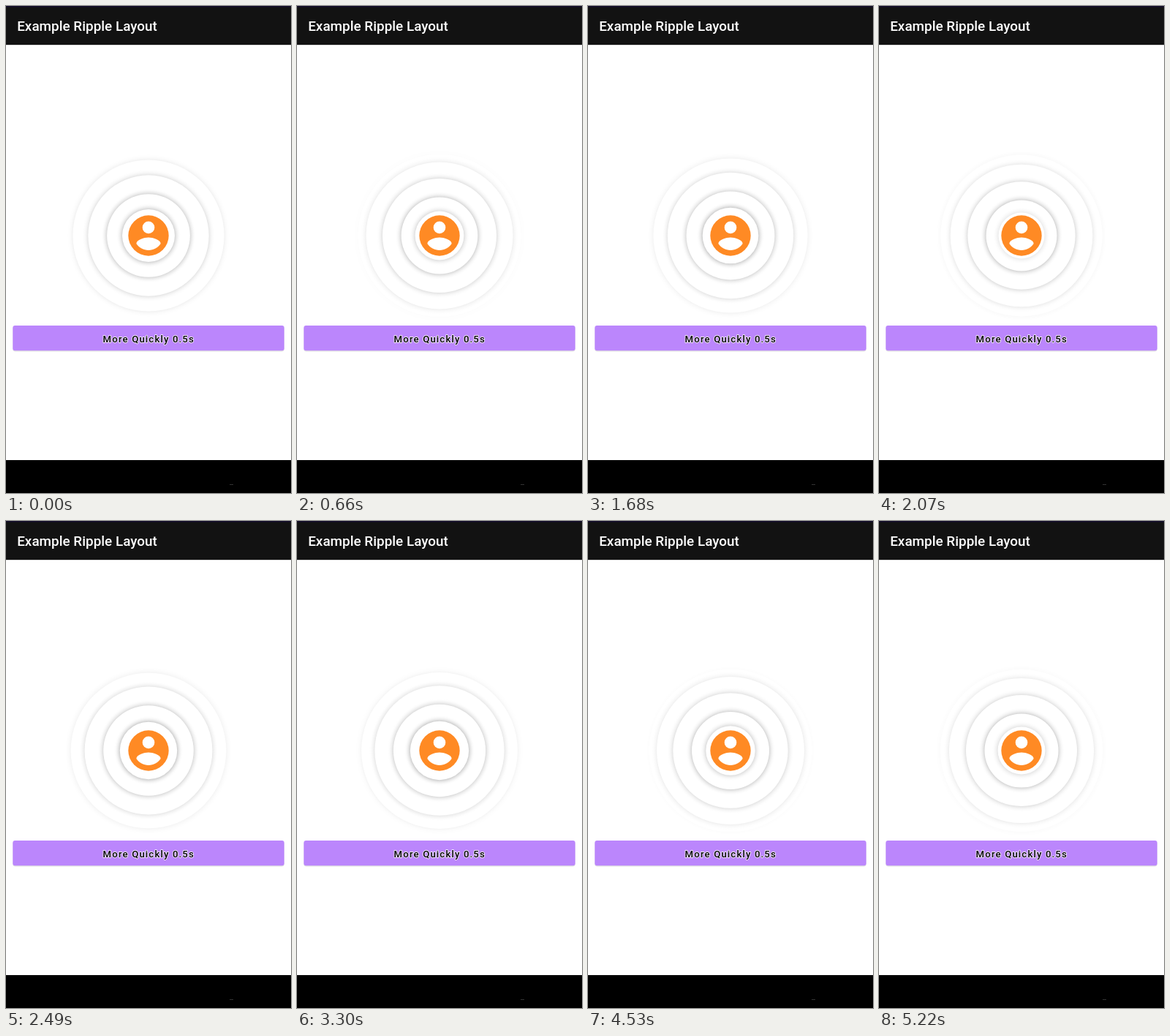
An HTML page with a canvas that plays this animation: 390x666 px, repeating every 5250 ms.

```html
<!DOCTYPE html>
<html lang="en">
<head>
<meta charset="utf-8">
<title>Example Ripple Layout</title>
<style>
  html, body { margin: 0; width: 100%; height: 100%; overflow: hidden; background: #fff; }
  canvas, svg { position: absolute; left: 0; top: 0; width: 390px; height: 666px; }
  text { font-family: Roboto, "Open Sans", sans-serif; font-weight: 500; }
  .title { font-size: 18.9px; fill: #fff; }
  .label {
    font-size: 13.2px; letter-spacing: 1.13px; fill: #000;
    stroke: #f3eaff; stroke-width: 1.8px; stroke-linejoin: round; paint-order: stroke;
  }
</style>
</head>
<body>
<canvas id="ripples" width="390" height="666"></canvas>
<svg viewBox="0 0 390 666">
  <rect width="390" height="54" fill="#000" opacity=".15"/>
  <rect width="390" height="53" fill="#121212"/>
  <rect width="390" height="1.5" fill="#120c2a"/>
  <text class="title" x="15.2" y="34">Example Ripple Layout</text>

  <g transform="translate(195 314) scale(2.768) translate(-12 -12)">
    <circle cx="12" cy="12" r="10" fill="#ff8a24"/>
    <circle cx="12" cy="8" r="3" fill="#fff"/>
    <path fill="#fff" d="M12 19.2c-2.5 0-4.71-1.28-6-3.22.03-1.99 4-3.08 6-3.08 1.99 0 5.97 1.09 6 3.08-1.29 1.94-3.5 3.22-6 3.22z"/>
  </g>

  <rect x="9.3" y="438.5" width="371.4" height="34" rx="3.5" fill="#000" opacity=".12"/>
  <rect x="9.3" y="437" width="371.4" height="34.3" rx="3" fill="#bb86fc"/>
  <text class="label" x="132.6" y="459.5">More Quickly 0.5s</text>

  <rect y="621" width="390" height="45"/>
  <rect x="306" y="654" width="5" height="1" fill="#333"/>
</svg>
<script>
  const LOOP = 5250, STEP = 30;
  const RINGS = 5, INTERVAL = 770;
  const CX = 195, CY = 314, R_START = 28, R_END = 111.5, BLUR = 8;

  const ctx = document.getElementById('ripples').getContext('2d');

  const easeInOut = u => (1 - Math.cos(Math.PI * u)) / 2;

  function smoothstep(a, b, x) {
    const k = Math.min(1, Math.max(0, (x - a) / (b - a)));
    return k * k * (3 - 2 * k);
  }

  function disc(r, fill) {
    ctx.fillStyle = fill;
    ctx.beginPath();
    ctx.arc(CX, CY, r, 0, Math.PI * 2);
    ctx.fill();
  }

  // A white disc with a soft shadow that fades as the ring grows.
  function drawRing(u) {
    const r = R_START + (R_END - R_START) * easeInOut(u);
    const alpha = .25 * (1 - u) * smoothstep(.05, .25, u);
    const shade = ctx.createRadialGradient(CX, CY, r, CX, CY, r + BLUR);
    for (let k = 0; k <= 1; k += .25) {
      shade.addColorStop(k, `rgba(0,0,0,${alpha * (1 - k) ** 2})`);
    }
    disc(r + BLUR, shade);
    disc(r, '#fff');
  }

  function draw(time) {
    const phase = Math.max(0, time - STEP) / INTERVAL % 1;
    ctx.clearRect(0, 0, 390, 666);
    for (let i = RINGS - 1; i >= 0; i--) drawRing((phase + i) / RINGS);
  }

  const start = performance.now();
  function tick() {
    const time = (performance.now() - start) % LOOP;
    draw(Math.floor(time / STEP) * STEP);
    requestAnimationFrame(tick);
  }
  tick();
</script>
</body>
</html>
```
